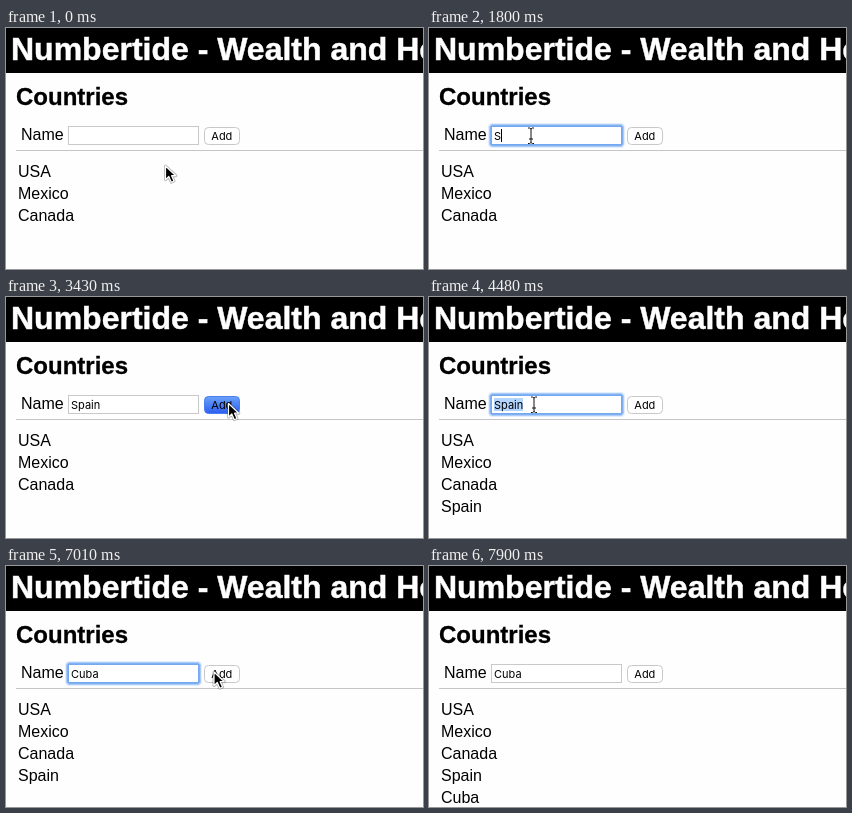
Animation, 417 px wide and 241 px high, one loop 8500 ms. Source, as an HTML page:

```html
<!DOCTYPE html>
<html lang="en">
<head>
<meta charset="utf-8">
<title>Countries</title>
<style>
  html, body { margin: 0; width: 100%; height: 100%; overflow: hidden; background: #fefefe; }
  svg { display: block; width: 417px; height: 241px; }
  text { font-family: "Liberation Sans", Arial, sans-serif; font-size: 16px; white-space: pre; }
  .title { font-size: 32px; font-weight: bold; fill: #fff; stroke: #fff; stroke-width: .5px; }
  .heading { font-size: 24px; font-weight: bold; stroke: #000; stroke-width: .3px; }
  .control { font-family: Inter, "Open Sans", sans-serif; font-size: 11px; }
</style>
</head>
<body>
<svg viewBox="0 0 417 241">
  <defs>
    <linearGradient id="pressed" x2="0" y2="1">
      <stop offset="0" stop-color="#6aa2fa"/>
      <stop offset="1" stop-color="#2d5df0"/>
    </linearGradient>
  </defs>

  <rect width="417" height="45"/>
  <text class="title" x="5" y="32">Numbertide - Wealth and Health</text>
  <text class="heading" x="10" y="77">Countries</text>
  <text x="15" y="112">Name</text>
  <path d="M10 122.5H417" stroke="#c5c5c5"/>
  <g id="list"></g>

  <rect x="62.5" y="98.5" width="130" height="18" fill="#fff" stroke="#c9c9c9"/>
  <g id="ring" fill="none">
    <rect x="59.5" y="95.5" width="136" height="24" rx="3.5" stroke="#e2eefd"/>
    <rect x="60.5" y="96.5" width="134" height="22" rx="2.5" stroke="#acccf8"/>
    <rect x="61.5" y="97.5" width="132" height="20" rx="1.5" stroke="#7fb0f3"/>
    <rect x="62.5" y="98.5" width="130" height="18" stroke="#75a8ee"/>
  </g>
  <rect id="selection" x="65" y="101" width="29" height="13" fill="#b3d5fe"/>
  <text id="value" class="control" x="65" y="112"></text>
  <rect id="caret" y="101" width="1" height="13"/>

  <rect id="button" x="198.5" y="99.5" width="35" height="17" rx="4"/>
  <text class="control" x="205.3" y="112">Add</text>

  <g id="arrow" stroke-linejoin="round">
    <path id="tip" d="M0 0V13.6L3.3 10.5L5.8 16.2L8.5 15L6.1 9.7H10.3Z"
          fill="none" stroke="#000" stroke-opacity=".15" stroke-width="3"/>
    <use href="#tip" y="0"/>
    <path d="M0 0V13.6L3.3 10.5L5.8 16.2L8.5 15L6.1 9.7H10.3Z" stroke="#fff" stroke-width="1.2"/>
  </g>
  <path id="beam" d="M-3 -7.5H-1.5L0 -6.5L1.5 -7.5H3M0 -6.5V7M-3 8H-1.5L0 7L1.5 8H3M-2 3.5H2"
        fill="none" stroke="#111"/>
</svg>
<script>
const LOOP = 8500;
const $ = id => document.getElementById(id);
const arrow = (x, y) => ({ pointer: "arrow", x, y });
const beam = (x, y) => ({ pointer: "beam", x, y });

// Each entry lists only what changes at that time (ms).
const steps = [
  [0, { ...arrow(159.5, 138), value: "", focus: false, caret: false,
        selected: false, pressed: false, count: 3 }],
  [150, arrow(131, 111.5)],
  [900, beam(102, 107.5)],
  [1050, { focus: true, caret: true }],
  [1500, { caret: false }],
  [1800, { value: "S", caret: true }],
  [1950, { value: "Sp" }],
  [2100, { value: "Spa" }],
  [2250, { value: "Spain" }],
  [2840, { ...arrow(244, 102), caret: false }],
  [3140, arrow(226, 106)],
  [3290, { ...arrow(222.5, 106.5), caret: true }],
  [3430, { focus: false, caret: false, pressed: true }],
  [3580, { pressed: false, count: 4 }],
  [3880, beam(105, 107.5)],
  [4330, { focus: true, caret: true }],
  [4480, { caret: false, selected: true }],
  [5820, { value: "C", caret: true, selected: false }],
  [5970, { value: "Cu" }],
  [6120, { value: "Cub" }],
  [6270, { value: "Cuba" }],
  [6710, { ...arrow(162, 108), caret: false }],
  [6860, arrow(198, 106)],
  [7010, arrow(208, 106)],
  [7160, { focus: false, pressed: true }],
  [7310, { pressed: false, count: 5 }],
  [7610, arrow(217.5, 107)],
  [7750, arrow(250, 226)],
  [7900, { pointer: "" }]
];

const rows = ["USA", "Mexico", "Canada", "Spain", "Cuba"].map((name, i) => {
  const row = document.createElementNS("http://www.w3.org/2000/svg", "text");
  row.textContent = name;
  row.setAttribute("x", 12);
  row.setAttribute("y", 149 + 22 * i);
  return $("list").appendChild(row);
});

const show = (el, on) => el.setAttribute("visibility", on ? "visible" : "hidden");

function render(time) {
  const state = Object.assign({}, ...steps.filter(([at]) => at <= time).map(([, change]) => change));
  rows.forEach((row, i) => show(row, i < state.count));
  $("value").textContent = state.value;
  show($("ring"), state.focus);
  show($("selection"), state.selected);
  show($("caret"), state.caret);
  const width = state.value ? $("value").getComputedTextLength() : 0;
  $("caret").setAttribute("x", Math.round(65 + width));
  $("button").setAttribute("fill", state.pressed ? "url(#pressed)" : "#fff");
  $("button").setAttribute("stroke", state.pressed ? "#4a7df0" : "#c8c8c8");
  for (const id of ["arrow", "beam"]) {
    show($(id), state.pointer === id);
    $(id).setAttribute("transform", `translate(${state.x} ${state.y})`);
  }
}

const start = performance.now();
function tick() {
  render((performance.now() - start) % LOOP);
  requestAnimationFrame(tick);
}
tick();
</script>
</body>
</html>
```
